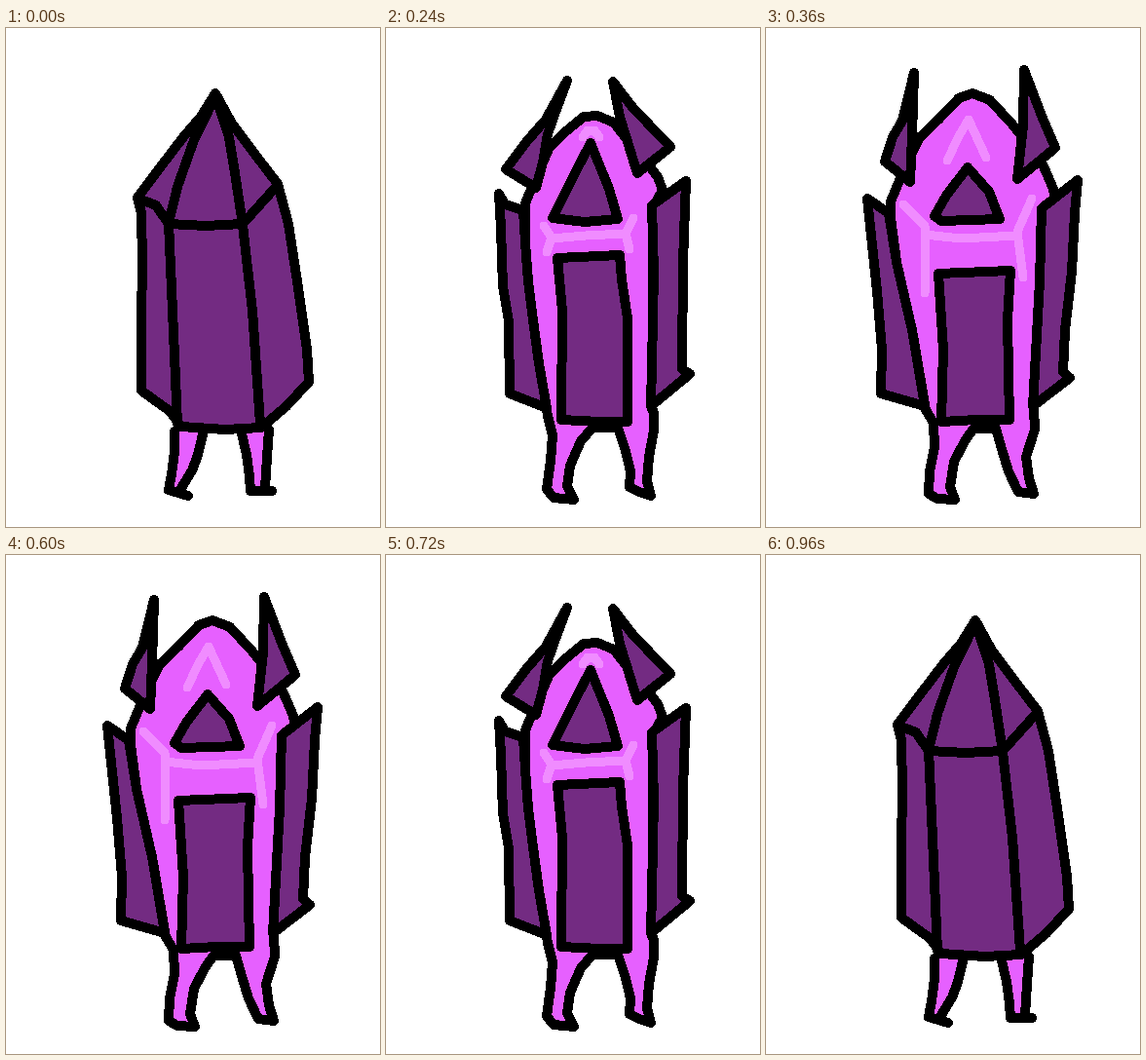
These frames come from a looping animation (384x512 px, 1.08 s). An HTML page without scripts:

```html
<!DOCTYPE html>
<html lang="en">
<head>
<meta charset="utf-8">
<title>Crystal creature</title>
<style>
  html, body { margin: 0; width: 100%; height: 100%; overflow: hidden; background: #fff; }
  svg { display: block; width: 384px; height: 512px; overflow: hidden; }
  path { stroke: #000; stroke-width: 10; stroke-linecap: round; stroke-linejoin: round; shape-rendering: crispEdges; }
  .skin { fill: #e660ff; }
  .shell { fill: #732b82; }
  .line { fill: none; }
  .glow { fill: none; stroke: #f08cff; stroke-width: 9; }
  .bare { stroke: none; }

  /* Poses stand side by side; the strip jumps open and back shut. */
  .strip { animation: unfold 1080ms step-end infinite; }
  @keyframes unfold {
    0%, 88.88% { transform: translateX(0); }
    11.11%, 77.77% { transform: translateX(-384px); }
    22.22%, 66.66% { transform: translateX(-768px); }
    33.33%, 55.55% { transform: translateX(-1152px); }
    44.44% { transform: translateX(-1536px); }
    100% { transform: translateX(0); }
  }
</style>
</head>
<body>
<svg viewBox="0 0 384 512">
  <g class="strip">
    <!-- closed -->
    <g>
      <path class="skin bare" d="M172 412L173 435 170 458 168 473 181 470 192 455 197 438 203 412ZM242 412L247 440 249 460 250 475 266 474 268 440 270 412Z"/>
      <path class="line" d="M173 414L173 435 170 458 167 474 187 480M202 417L197 438 191 454 180 472M242 416L247 438 250 460 251 475 273 475M270 412L268 440 266 472"/>
      <path class="shell" d="M215 67L200 91 182 112 156 146 135 174 139 190 140 240 139 300 139 372 168 393 180 409 225 412 262 410 288 388 311 363 309 330 299 260 290 201 279 160 256 130 232 98Z"/>
      <path class="line" d="M215 70L193 115 176 163 167 200 171 290 176 406M215 70L229 112 236 155 243 202 253 290 261 406M136 175L154 182 167 201 205 203 243 201 279 161"/>
    </g>

    <!-- cracking -->
    <g transform="translate(384)">
      <path class="skin" d="M213 82L194 103 170 140 153 178 152 240 158 320 170 400 173 425 170 452 167 476 188 482 184 471 192 442 206 412 241 412 248 438 250 474 272 478 269 442 274 402 268 300 262 190 252 140 230 100Z"/>
      <path class="shell" d="M205 62L184 94 129 160 159 181 171 139 188 100Z"/>
      <path class="shell" d="M223 62L244 91 286 141 250 177 243 131 233 94Z"/>
      <path class="shell" d="M126 173L151 188 158 250 171 397 133 374 133 300Z"/>
      <path class="shell" d="M293 158L257 191 262 260 267 397 312 359 303 300Z"/>
      <path class="shell" d="M213 92L190 141 169 198 204 201 241 198 228 142Z"/>
      <path class="shell" d="M172 219L242 217 248 290 255 408 180 407 175 310Z"/>
    </g>

    <!-- loosened -->
    <g transform="translate(768)">
      <path class="skin" d="M203 91L186 105 168 122 158 145 150 163 143 180 143 220 146 260 151 300 157 344 166 398 171 418 169 444 165 473 172 482 193 484 186 470 189 449 200 424 212 410 238 410 246 434 251 455 250 471 260 476 272 480 268 465 270 440 275 413 275 395 272 388 274 300 274 185 284 166 279 153 268 138 250 118 234 97 217 90Z"/>
      <path class="glow" d="M202 112L207 105 214 105 219 112M162 203L170 215 165 230M170 216L205 213 246 211M254 195L246 211 250 227"/>
      <path class="shell" d="M186 54L164 94 144 117 123 145 154 164 161 138 166 109 174 86Z"/>
      <path class="shell" d="M233 55L252 80 269 98 292 122 258 149 249 120 240 91Z"/>
      <path class="shell" d="M116 170L122 181 141 187 143 220 146 260 151 300 157 344 165 390 127 375 126 301 120 265 118 205Z"/>
      <path class="shell" d="M308 157L273 182 275 250 274 300 272 388 312 355 304 350 305 240Z"/>
      <path class="shell" d="M210 118L193 151 171 195 204 199 238 196 229 165Z"/>
      <path class="shell" d="M176 236L240 233 242 258 248 298 248 404 219 404 180 402 181 290Z"/>
    </g>

    <!-- opening -->
    <g transform="translate(1152)">
      <path class="skin" d="M212 67L198 72 178 93 158 112 143 142 128 178 128 195 134 240 150 310 164 392 172 405 173 430 168 455 167 478 176 483 194 484 189 471 193 445 204 424 213 411 236 411 242 432 249 455 259 476 275 478 270 462 267 440 276 412 275 390 281 260 283 186 297 178 295 165 285 142 270 120 253 99 230 74Z"/>
      <path class="glow" d="M186 136L198 111 208 94 226 133M141 181L163 203 163 272M163 212L200 216 258 213M273 175L258 209 264 256"/>
      <path class="shell" d="M152 46L140 95 130 112 122 137 148 158 150 110Z"/>
      <path class="shell" d="M265 43L264 100 258 155 297 123 283 90Z"/>
      <path class="shell" d="M104 175L126 190 134 240 150 310 163 388 118 375 119 330 114 270Z"/>
      <path class="shell" d="M320 156L283 185 281 260 274 388 312 359 305 353 307 310 314 250 317 190Z"/>
      <path class="shell" d="M207 143L185 172 173 193 180 198 240 196 229 168Z"/>
      <path class="shell" d="M177 252L251 249 248 300 250 402 216 402 180 404 182 330Z"/>
    </g>

    <!-- wide open -->
    <g transform="translate(1536)">
      <path class="skin" d="M205 41L196 46 186 60 177 81 166 101 149 115 125 155 104 166 97 175 107 190 115 217 124 252 140 322 157 386 167 395 171 418 171 478 178 482 194 481 196 460 207 434 219 415 235 415 242 434 249 458 259 474 278 475 272 462 267 440 272 413 276 392 291 300 303 230 313 166 300 153 284 140 263 113 241 97 225 78 214 47Z"/>
      <path class="glow" d="M187 131L198 109 207 79 214 113 226 142M126 180L159 212 160 305M159 220L261 214M285 178L261 214 265 277"/>
      <path class="shell" d="M131 41L120 85 113 137 143 153 142 106Z"/>
      <path class="shell" d="M284 41L278 90 262 146 297 124 294 90Z"/>
      <path class="shell" d="M70 174L107 190 115 217 124 252 140 322 157 387 114 368 100 322 88 262 79 222Z"/>
      <path class="shell" d="M343 156L309 183 303 230 291 300 279 360 275 391 312 361 316 322 324 270 338 208Z"/>
      <path class="shell" d="M201 157L174 190 176 199 240 189 234 180Z"/>
      <path class="shell" d="M180 267L252 269 247 310 249 402 214 401 180 404 183 340Z"/>
    </g>
  </g>
</svg>
</body>
</html>
```
